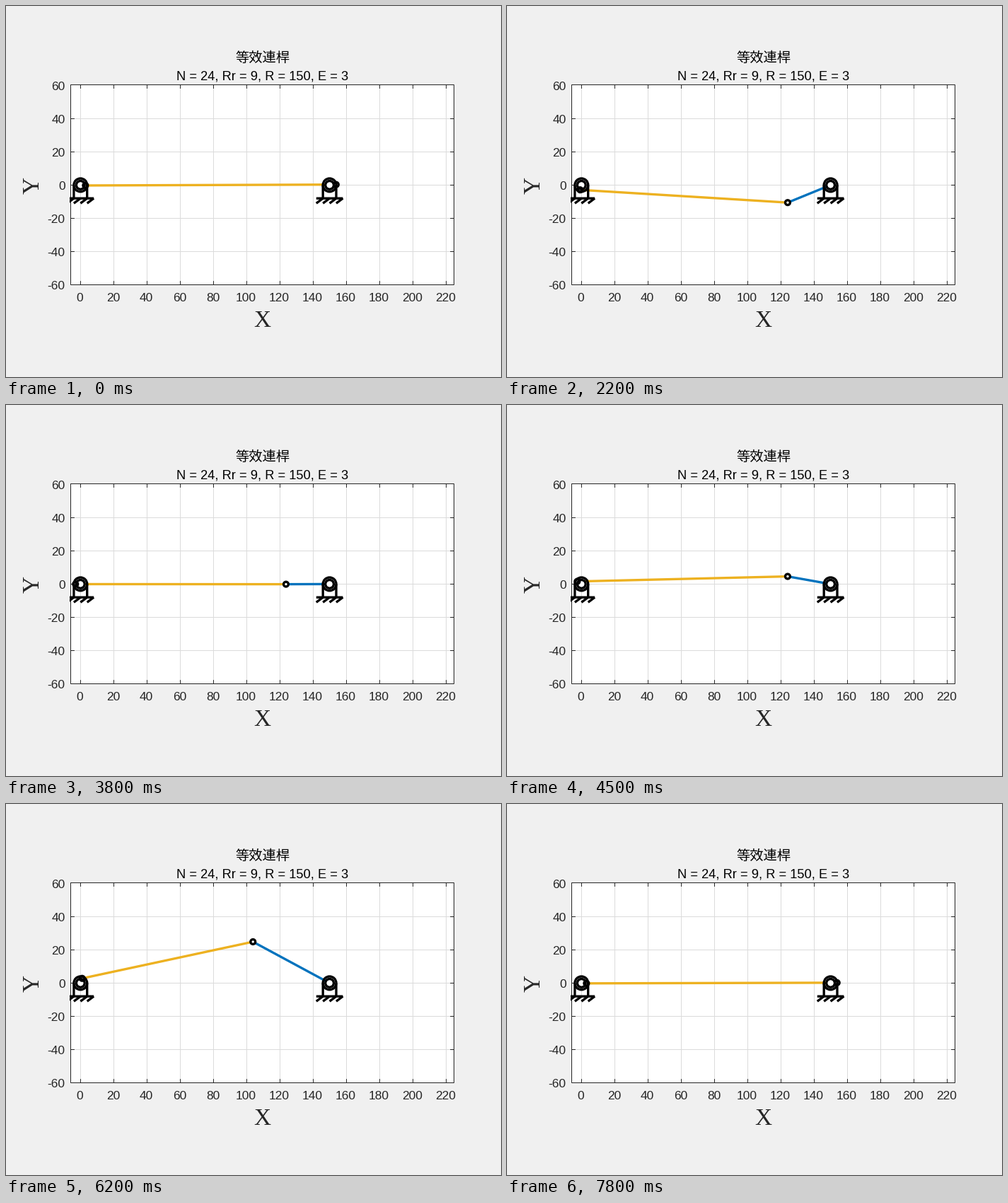
A matplotlib script for the animation above (7900 ms loop, 700 by 525 pixels).

```python
import matplotlib.pyplot as plt
import numpy as np
from matplotlib.animation import FuncAnimation
from matplotlib.patches import Circle, Rectangle

W, H = 700, 525
PT = 0.72                        # points per pixel at 100 dpi
N, R, E = 24, 150, 3             # pins, pin circle radius, eccentricity
FRAMES, STEP = 79, np.radians(0.2) * (N - 1)

SCALE, X0, Y0 = 2.3485, 105.3, 253.4
LEFT, RIGHT, TOP, BOTTOM = 91.5, 633.5, 111.5, 394.5
INK, GRID = "#262626", "#dbdbdb"
BLUE, YELLOW = "#0072bd", "#edb120"
THICK = 3.33

fig = plt.figure(figsize=(7, 5.25), dpi=100, facecolor="#f0f0f0")
ax = fig.add_axes([0, 0, 1, 1])
ax.set_xlim(0, W)
ax.set_ylim(H, 0)
ax.axis("off")


def px(x, y):
    return X0 + SCALE * np.asarray(x, float), Y0 - SCALE * np.asarray(y, float)


def line(xs, ys, color, width, z):
    return ax.plot(xs, ys, color=color, lw=width * PT, zorder=z,
                   solid_capstyle="butt", snap=False)[0]


def label(x, y, s, size, font="Liberation Sans", color=INK, **kw):
    kw = {"ha": "center", "va": "baseline", **kw}
    ax.text(x, y, s, fontsize=size * PT, family=font, color=color, **kw)


def clip(artist):
    pad = 1.6
    artist.set_clip_path(Rectangle((LEFT - pad, TOP - pad),
                                   RIGHT - LEFT + 2 * pad,
                                   BOTTOM - TOP + 2 * pad,
                                   transform=ax.transData))
    return artist


def disc(x, y, r, width, z, face="white", edge="black"):
    return ax.add_patch(Circle((x, y), r, fc=face, ec=edge, lw=width * PT,
                               zorder=z))


def box(z, **kw):
    ax.add_patch(Rectangle((LEFT, TOP), RIGHT - LEFT, BOTTOM - TOP,
                           zorder=z, snap=False, **kw))


def draw_axes():
    box(0, fc="white", ec="none")
    tick = 5.4
    for v in range(0, 221, 20):
        x = np.floor(px(v, 0)[0] + 0.1) + 0.5
        line([x, x], [TOP, BOTTOM], GRID, 1, 1)
        line([x, x], [TOP, TOP + tick], INK, 1, 2)
        line([x, x], [BOTTOM, BOTTOM - tick], INK, 1, 2)
        label(x - 1, 418.5, str(v), 17.33)
    for v in range(-60, 61, 20):
        y = np.floor(px(0, v)[1]) + 0.5
        if abs(v) < 60:
            line([LEFT, RIGHT], [y, y], GRID, 1, 1)
            line([LEFT, LEFT + tick], [y, y], INK, 1, 2)
            line([RIGHT, RIGHT - tick], [y, y], INK, 1, 2)
        label(83.7, y + 6.8, str(v), 17.33, ha="right")
    box(2, fc="none", ec=INK, lw=PT)
    label(362.5, 78.8, "等效連桿", 19.3, "Noto Sans CJK JP", "black")
    label(362.5, 104.3, f"N = {N}, Rr = 9, R = {R}, E = {E}", 18.3,
          color="black")
    label(362.8, 454.2, "X", 33.3, "Liberation Serif")
    label(46.8, 254, "Y", 33.3, "Liberation Serif", rotation=90,
          rotation_mode="anchor")


def draw_pivot(cx):
    """Grounded bearing: two rings, a bracket and hatching."""
    x, y = px(cx, 0)
    disc(x, y, 2.5 * SCALE, 0, 5, edge="none")
    for r in (2.5, 4):
        disc(x, y, r * SCALE, THICK, 8, face="none")
    strokes = [((-4, -4), (0, -8)), ((4, 4), (0, -8)), ((-8, 8), (-8, -8))]
    strokes += [((t, t - 4), (-8, -11)) for t in (-4, 0, 4, 8)]
    for xs, ys in strokes:
        clip(line(*px(np.add(xs, cx), ys), "black", THICK, 7))


def linkage(phi):
    """Crank pin and centre of curvature of the disc profile."""
    c, s = np.cos(phi), np.sin(phi)
    k = E * N / R
    rho = (R * (1 + k * k - 2 * k * c) ** 1.5
           / (1 + N * k * k - (N + 1) * k * c))
    normal = np.array([E * N * c - R, E * N * s])
    joint = np.array([R, 0]) + rho * normal / np.hypot(*normal)
    return np.array([E * c, E * s]), joint


draw_axes()
draw_pivot(0)
draw_pivot(R)
follower = clip(line([], [], BLUE, THICK, 3))
coupler = clip(line([], [], YELLOW, THICK, 3.5))
joint_dot = disc(0, 0, 3.4, THICK, 4)
crank_dot = disc(0, 0, 3.4, THICK, 6)


def update(i):
    crank, joint = linkage(-STEP * (i + 1))
    follower.set_data(*px([R, joint[0]], [0, joint[1]]))
    coupler.set_data(*px([crank[0], joint[0]], [crank[1], joint[1]]))
    crank_dot.center = px(*crank)
    joint_dot.center = jx, jy = px(*joint)
    joint_dot.set_visible(bool(LEFT <= jx <= RIGHT and TOP <= jy <= BOTTOM))
    return follower, coupler, joint_dot, crank_dot


anim = FuncAnimation(fig, update, frames=FRAMES, interval=100, repeat=True)
plt.show()
```
